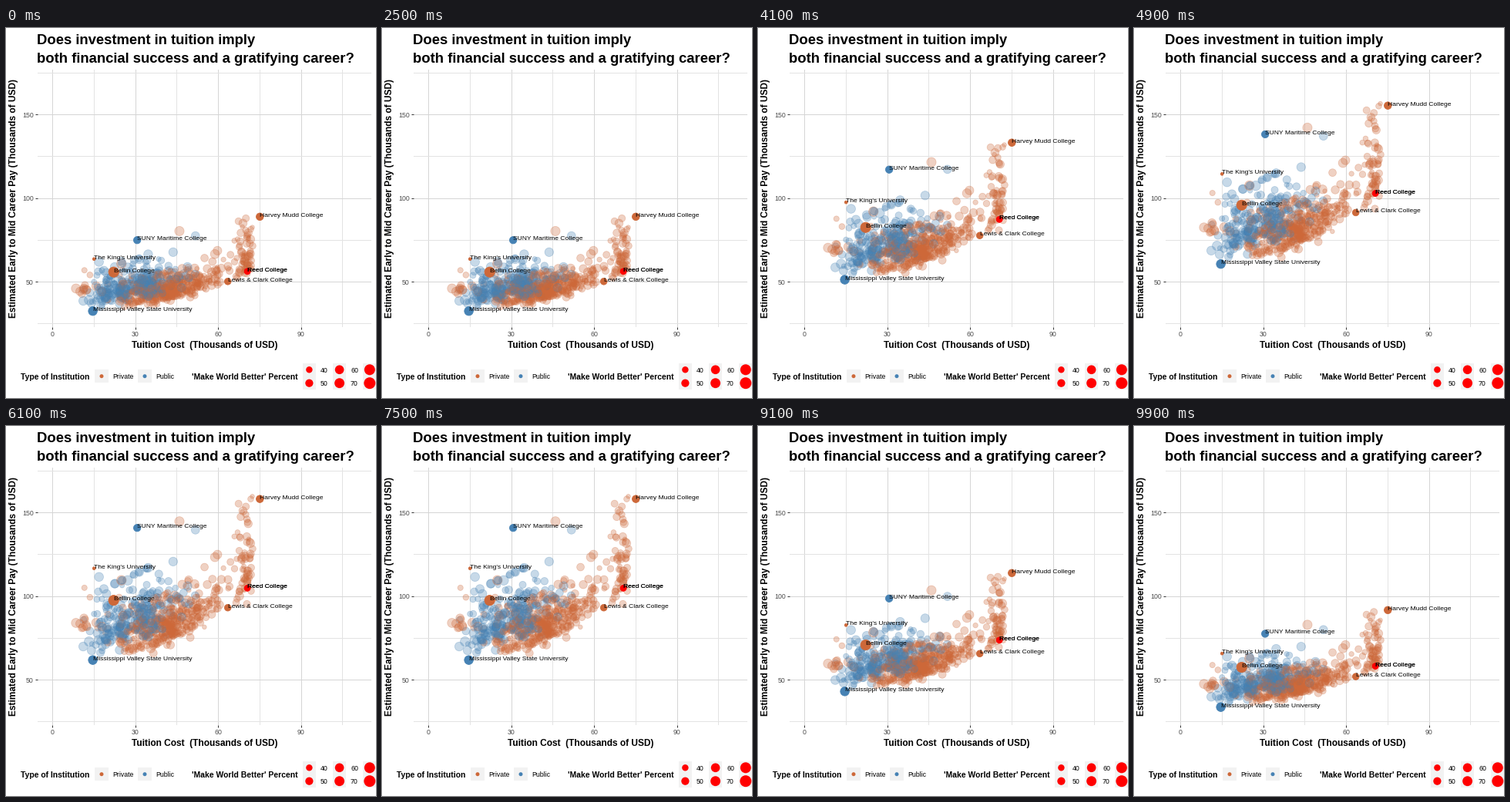
Animation of 480 by 480 pixels, one loop 10000 ms. Source, as a matplotlib script:

```python
import numpy as np
import matplotlib.pyplot as plt
from matplotlib.animation import FuncAnimation
from matplotlib.patches import Circle, Rectangle

SIZE, DPI = 480, 96
PX = 72 / DPI  # points per pixel
FRAMES, HOLD = 100, 25
SIENNA, STEEL, RED = "#CD6839", "#4682B4", "#FF0000"
EARLY_SHARE = 0.555  # early pay relative to mid career pay

plt.rcParams["font.family"] = "Liberation Sans"
rng = np.random.default_rng(7)

# name, colour, tuition, early pay, mid pay, percent
LABELLED = [
    ("Harvey Mudd College", SIENNA, 75.1, 88.9, 158.1, 46),
    ("SUNY Maritime College", STEEL, 30.7, 74.9, 140.8, 45),
    ("The King's University", SIENNA, 15.1, 63.6, 116.6, 27),
    ("Bellin College", SIENNA, 22.2, 55.8, 97.5, 73),
    ("Mississippi Valley State University", STEEL, 14.65, 32.5, 61.8, 59),
    ("Lewis & Clark College", SIENNA, 63.5, 50.2, 93.1, 41),
    ("Reed College", RED, 70.6, 56.2, 104.8, 38),
]

# Unlabelled schools far from the crowd: colour, tuition, mid pay, percent
LONERS = [
    (SIENNA, 46.0, 144.7, 64),
    (SIENNA, 67.4, 155.3, 43),
    (STEEL, 51.8, 139.6, 54),
    (SIENNA, 25.0, 109.5, 66),
    (STEEL, 16.9, 111.5, 60),
]


def radius(percent):
    """Dot radius in pixels, with area growing with the percentage."""
    return 1.4 + np.sqrt(0.585 * np.maximum(np.asarray(percent) - 26.6, 0))


def spread(n, mean, sd, low, high):
    """Normal draws kept inside a range."""
    draws = rng.normal(mean, sd, n * 6)
    return draws[(draws > low) & (draws < high)][:n]


def cloud(cost, pay, noise, percent):
    """Rows of tuition, early pay, mid pay, percent; pay is skewed upwards."""
    n = len(cost)
    mid = pay * np.exp(noise * np.minimum(rng.gumbel(size=n), 3.4))
    early = mid * rng.normal(EARLY_SHARE - 0.01, 0.014, n)
    return np.column_stack([cost, early, mid, rng.normal(percent, 9, n).clip(30, 72)])


def private_pay(cost):
    return 70 + 43 * (cost / 70) ** 3


main = spread(350, 43, 11, 24, 65)
elite = spread(65, 69.5, 1.9, 64, 72.5)
cheap = rng.uniform(7, 28, 24)
state = spread(250, 29.5, 8.5, 10, 52)
private = np.vstack([
    cloud(main, private_pay(main), 0.075, 42),
    cloud(elite, private_pay(elite), 0.09, 41),
    cloud(cheap, 80, 0.08, 47),
])
public = cloud(state, 66 + 0.58 * state, 0.09, 47)
loners = np.array([(cost, EARLY_SHARE * mid, mid, pct) for _, cost, mid, pct in LONERS])

schools = np.vstack([private, public, loners])
colors = np.array([SIENNA] * len(private) + [STEEL] * len(public)
                  + [row[0] for row in LONERS])
order = rng.permutation(len(schools))
schools, colors = schools[order], colors[order]
marked = np.array([row[2:] for row in LABELLED])

fig = plt.figure(figsize=(SIZE / DPI, SIZE / DPI), dpi=DPI, facecolor="white")

# Panel
LEFT, RIGHT, TOP, BOTTOM = 40.6, 474.1, 53.74, 387.74
ax = fig.add_axes([LEFT / SIZE, 1 - BOTTOM / SIZE,
                   (RIGHT - LEFT) / SIZE, (BOTTOM - TOP) / SIZE])
ax.set_xlim(-5.44, 115.5)
ax.set_ylim(23.04, 176.96)
ax.set_xticks(range(0, 91, 30))
ax.set_xticks(range(15, 106, 30), minor=True)
ax.set_yticks(range(50, 151, 50))
ax.set_yticks(range(25, 176, 50), minor=True)
ax.set_axisbelow(True)
ax.grid(which="major", color="#D5D5D5", lw=PX)
ax.grid(which="minor", color="#E3E3E3", lw=PX)
ax.tick_params(which="major", length=3 * PX, width=PX, color="#333333",
               labelcolor="#4D4D4D", labelsize=8.8 * PX, pad=1.8 * PX)
ax.tick_params(which="minor", length=0)
ax.spines[:].set_visible(False)


def dots(data, color, alpha):
    return ax.scatter(data[:, 0], data[:, 1], s=(2 * radius(data[:, 3]) * PX) ** 2,
                      c=color, alpha=alpha, edgecolors="face",
                      linewidths=0.8 * PX, zorder=3)


crowd = dots(schools, colors, 0.3)
stars = dots(marked, [row[1] for row in LABELLED], 1)
labels = []
for i, (name, color, cost, early, *_) in enumerate(LABELLED):
    for _ in range(2 if color == RED else 1):  # drawn twice to look heavier
        text = ax.text(cost, early, name, size=8.45 * PX, color="black", zorder=5)
        labels.append((text, i))

# Titles and legends, in pixels from the top left
page = fig.add_axes([0, 0, 1, 1])
page.set_xlim(0, SIZE)
page.set_ylim(SIZE, 0)
page.axis("off")


def write(x, y, text, size, **style):
    page.text(x, y, text, size=size * PX, **style)


def heading(x, y, text, size, **style):
    write(x, y, text, size, weight="bold", **style)


def key(x, y, r, color, text):
    page.add_patch(Rectangle((x - 8.7, y - 8.7), 17.4, 17.4, color="#F2F2F2", lw=0))
    page.add_patch(Circle((x, y), r, color=color, lw=0))
    write(x + 14.5, y, text, 8.8, va="center_baseline")


heading(40.5, 21, "Does investment in tuition imply", 18.5)
heading(40.5, 45, "both financial success and a gratifying career?", 18.5)
heading(257.5, 415, "Tuition Cost  (Thousands of USD)", 11.85, ha="center")
heading(10.5, 221, "Estimated Early to Mid Career Pay (Thousands of USD)", 11.85,
        ha="center", va="center", rotation=90)

heading(19, 456, "Type of Institution", 10.4)
key(124, 451.7, 2.5, SIENNA, "Private")
key(180, 451.7, 2.5, STEEL, "Public")

heading(241, 456, "'Make World Better' Percent", 10.4)
for i, percent in enumerate(range(40, 100, 10)):
    col, row = divmod(i, 2)
    key(393.4 + 39.2 * col, 443.3 + 17.4 * row, radius(percent), RED,
        percent if col < 2 else "")


def blend(data, t):
    return data[:, 1] + (data[:, 2] - data[:, 1]) * t


def draw(frame):
    rise = np.clip(frame / HOLD - 1, 0, 1)
    fall = np.clip(frame / HOLD - 3, 0, 1)
    t = rise - fall
    pay = blend(marked, t)
    crowd.set_offsets(np.column_stack([schools[:, 0], blend(schools, t)]))
    stars.set_offsets(np.column_stack([marked[:, 0], pay]))
    for text, i in labels:
        text.set_y(pay[i])
    return [crowd, stars] + [text for text, _ in labels]


anim = FuncAnimation(fig, draw, frames=FRAMES, interval=100, repeat=True, repeat_delay=0)
plt.show()
```
